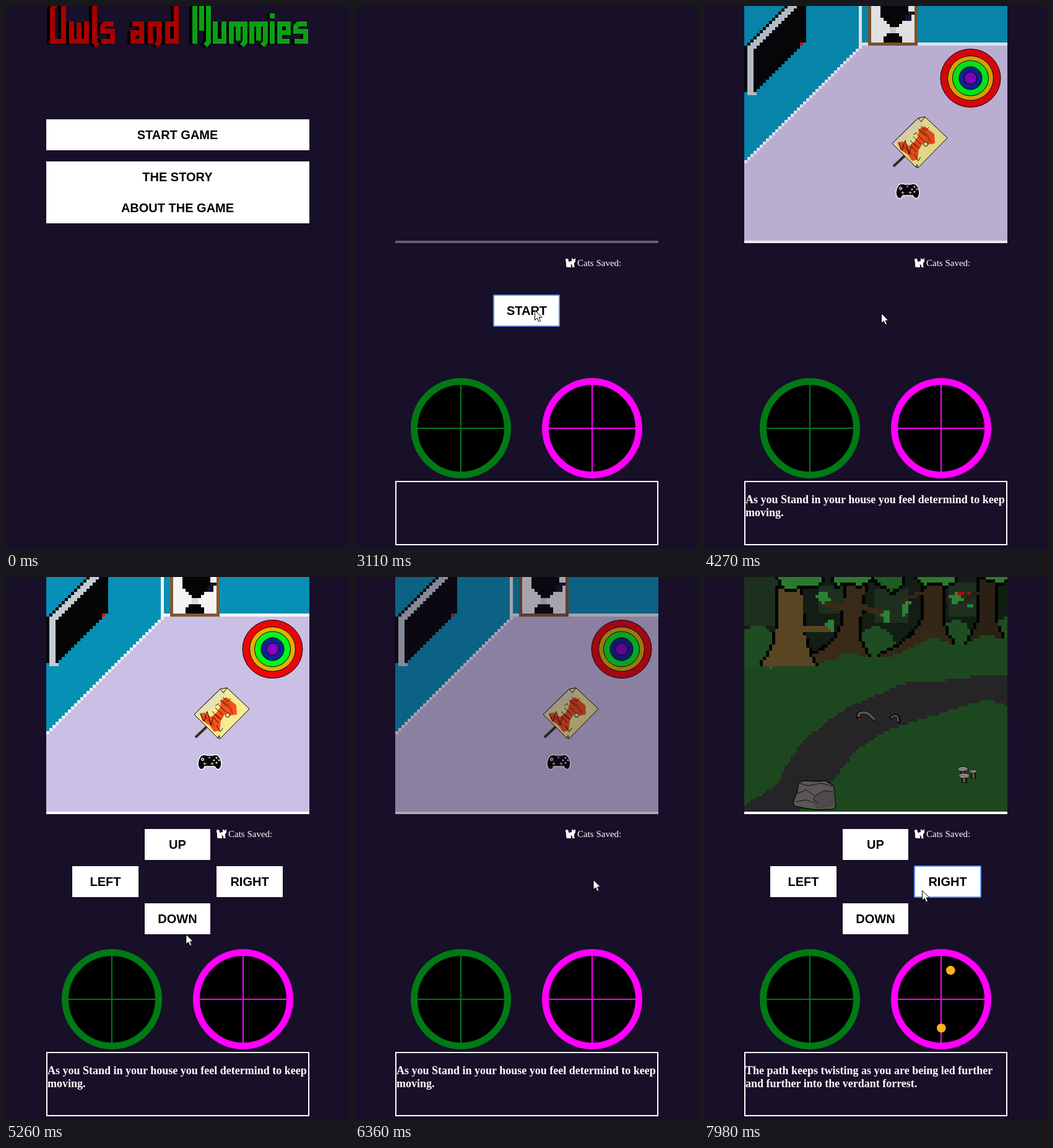
An HTML page with a canvas that plays this animation: 554x877 px, repeating every 8000 ms.

```html
<!DOCTYPE html>
<html lang="en">
<head>
<meta charset="utf-8">
<title>Owls and Mummies</title>
<style>
html, body { margin: 0; width: 100%; height: 100%; overflow: hidden; background: #180f28; }
svg, #view, canvas { position: absolute; left: 0; top: 0; }
#view { width: 490px; height: 383px; }
#line { position: absolute; left: 65px; top: 379px; width: 425px; height: 4px; background: #fff; }
.ui { font: bold 20px "Liberation Sans", Arial, sans-serif; text-anchor: middle; }
.say { font: bold 18px "Liberation Serif", Times, serif; fill: #fff; }
.label { font: 15px "Liberation Serif", Times, serif; fill: #fff; }
.ring { fill: none; stroke: #5b93f0; stroke-width: 2; }

/* one loop is 8 s, so 1% is 80 ms */
#menu, #menuRing, #game, #view, #room, #forest, #start, #startRing, #pad, #rightRing, #say1, .late, #cursor {
  animation: 8s linear infinite;
}
#menuRing, #game, #room, #forest, #start, #startRing, #pad, #rightRing, #say1, .late {
  animation-timing-function: step-end;
}
#menu { animation-name: menu; }
#menuRing { animation-name: menuRing; }
#game { animation-name: game; }
#view { animation-name: view; }
#room, #say1 { animation-name: inHouse; }
#forest, .late { animation-name: inForest; }
#start { animation-name: start; }
#startRing { animation-name: startRing; }
#pad { animation-name: pad; }
#rightRing { animation-name: rightRing; }
#cursor { animation-name: cursor; }

@keyframes menu {
  0%, 8.2% { opacity: 1; animation-timing-function: cubic-bezier(.37,0,.63,1); }
  12.8%, 100% { opacity: 0; }
}
@keyframes menuRing { 0% { opacity: 0; } 7.9%, 100% { opacity: 1; } }
@keyframes game { 0% { opacity: 0; } 13%, 100% { opacity: 1; } }
@keyframes view {
  0%, 12.99% { opacity: 0; }
  13% { opacity: 1; }
  33.6% { opacity: 1; animation-timing-function: cubic-bezier(.37,0,.63,1); }
  42.3% { opacity: 0; }
  45.5% { opacity: 0; animation-timing-function: cubic-bezier(.37,0,.63,1); }
  55.3% { opacity: 1; }
  76.24% { opacity: 1; }
  76.25% { opacity: .91; animation-timing-function: cubic-bezier(.37,0,.63,1); }
  85.3% { opacity: 0; }
  87.5% { opacity: 0; animation-timing-function: cubic-bezier(.37,0,.63,1); }
  97.9%, 100% { opacity: 1; }
}
@keyframes inHouse { 0% { opacity: 0; } 43.5% { opacity: 1; } 86.3%, 100% { opacity: 0; } }
@keyframes inForest { 0% { opacity: 0; } 86.3%, 100% { opacity: 1; } }
@keyframes start { 0% { opacity: 1; } 43.5%, 100% { opacity: 0; } }
@keyframes startRing { 0% { opacity: 0; } 29.7%, 100% { opacity: 1; } }
@keyframes pad { 0% { opacity: 0; } 57.2% { opacity: 1; } 73.5% { opacity: 0; } 98.7%, 100% { opacity: 1; } }
@keyframes rightRing { 0% { opacity: 0; } 72.5%, 100% { opacity: 1; } }
@keyframes cursor {
  0%, .86% { transform: translate(395px, 702px); opacity: 0; }
  .87% { transform: translate(395px, 702px); opacity: 1; animation-timing-function: ease-in-out; }
  7.6%, 19.6% { transform: translate(327px, 210px); animation-timing-function: ease-in-out; }
  29.7% { transform: translate(278px, 472px); }
  30.9%, 33.5% { transform: translate(293px, 479px); }
  38.5%, 42.5% { transform: translate(290px, 491px); }
  44.5%, 56.8% { transform: translate(286px, 496px); }
  61.9%, 64% { transform: translate(283px, 563px); }
  65.5% { transform: translate(290px, 577px); animation-timing-function: ease-in-out; }
  72%, 76.6% { transform: translate(386px, 488px); }
  82.3% { transform: translate(383px, 489px); }
  86.4%, 88% { transform: translate(382px, 490px); }
  97.8%, 100% { transform: translate(352px, 506px); opacity: 1; }
}
</style>
</head>
<body>
<div id="view">
  <canvas id="room" width="490" height="379"></canvas>
  <canvas id="forest" width="490" height="379"></canvas>
  <div id="line"></div>
</div>
<svg width="554" height="877">
  <g id="menu">
    <g id="title" role="img" aria-label="Owls and Mummies"></g>
    <path fill="#fff" d="M65 183h425v50H65zM65 251h425v100H65z"/>
    <rect id="menuRing" class="ring" x="65" y="183" width="425" height="50" rx="1"/>
    <g class="ui">
      <text x="277" y="215">START GAME</text>
      <text x="277" y="283">THE STORY</text>
      <text x="277" y="333">ABOUT THE GAME</text>
    </g>
  </g>
  <g id="game">
    <path fill="#fff" d="M340 410q0-2 2-2 3 0 3 4v1l5-1v-5l2 2h2l2-2v5q0 2-2 3v5l1 2h-4v-3q-1-2-3-2 2 2 1 5h-6q-2 0-2-3v-4q0-3-1-3z"/>
    <text class="label" x="359" y="420">Cats Saved:</text>
    <g id="start" class="ui">
      <rect x="224" y="467" width="106" height="50" fill="#fff"/>
      <rect id="startRing" class="ring" x="224" y="467" width="106" height="50" rx="1"/>
      <text x="277.5" y="499">START</text>
    </g>
    <g id="pad" class="ui">
      <path fill="#fff" d="M224 407h106v50H224zM107 467h107v50H107zM340 467h107v50H340zM224 527h106v50H224z"/>
      <rect id="rightRing" class="ring" x="340" y="467" width="107" height="50" rx="1"/>
      <text x="277" y="439">UP</text>
      <text x="160.5" y="499">LEFT</text>
      <text x="393.5" y="499">RIGHT</text>
      <text x="277" y="559">DOWN</text>
    </g>
    <g stroke="#007a14">
      <circle cx="171" cy="682" r="75.5" stroke-width="11"/>
      <path stroke-width="2" d="M171 607v150M96 682h150"/>
    </g>
    <g stroke="#f0f">
      <circle cx="383" cy="682" r="75.5" stroke-width="11"/>
      <path stroke-width="2" d="M383 607v150M308 682h150"/>
    </g>
    <g class="late" fill="#ffb31a">
      <circle cx="398.3" cy="635.3" r="7.3"/>
      <circle cx="383.3" cy="728.5" r="7.3"/>
    </g>
    <rect x="66" y="768" width="423" height="102" fill="none" stroke="#fff" stroke-width="2"/>
    <g id="say1" class="say">
      <text x="67" y="803">As you Stand in your house you feel determind to keep</text>
      <text x="67" y="824">moving.</text>
    </g>
    <g class="say late">
      <text x="67" y="803">The path keeps twisting as you are being led further</text>
      <text x="67" y="824">and further into the verdant forrest.</text>
    </g>
  </g>
  <path id="cursor" fill="#fff" stroke="#000" d="M.5.5v16l3.8-3.6 2.5 6 2.8-1.2-2.5-5.7h5z"/>
</svg>
<script>
// Title lettering: stroke path and advance for each letter
const glyphs = {
  O: ["M4 57V4L10-4H22V57Z", 31],
  w: ["M4 25V57H28V25M16 27V57", 37],
  l: ["M4-5V58L9 64", 13],
  s: ["M22 29H8L4 33V41H20V57H2", 26],
  a: ["M3 29H18V57H4V43H18", 28],
  n: ["M4 61V29H18V58L13 64", 28],
  d: ["M18-5V57H4V29H18", 28],
  M: ["M4 61V-4H26V58L21 64M15 0V40", 33],
  u: ["M4 25V57H18V25", 26],
  m: ["M4 61V29H26V58L21 64M15 29V56", 33],
  i: ["M4 25V61M4 12V20", 12],
  e: ["M20 57H4V29H18V43H4", 26]
};

function word(text, x, color) {
  let out = "";
  for (const ch of text) {
    const [d, step] = glyphs[ch];
    out += `<path d="${d}" transform="translate(${x})"/>`;
    x += step;
  }
  const layer = (c, dx, dy) =>
    `<g fill="none" stroke-width="8" stroke="${c}" transform="translate(${dx} ${dy})">${out}</g>`;
  return layer("#000", -5, 1) + layer(color, 0, 0);
}
document.getElementById("title").innerHTML =
  word("Owls", 71, "#a80000") + word("and", 201, "#a80000") + word("Mummies", 301, "#0a9f14");

const CELL = 5;
const context = id => document.getElementById(id).getContext("2d");

// Fill a path in blocks, with an optional one-block black outline
function blocks(g, color, d, outlined) {
  const path = new Path2D(d);
  g.lineWidth = 9;
  const pass = (fill, hit) => {
    g.fillStyle = fill;
    for (let y = -1; y < 379; y += CELL)
      for (let x = 65; x < 490; x += CELL)
        if (hit(x + 2.5, y + 2.5)) g.fillRect(x, y, CELL, CELL);
  };
  if (outlined) pass("#030303", (x, y) => g.isPointInStroke(path, x, y));
  pass(color, (x, y) => g.isPointInPath(path, x, y));
}

function shape(g, d, fill, line, width = 1) {
  const path = new Path2D(d);
  if (fill) { g.fillStyle = fill; g.fill(path); }
  if (line) { g.strokeStyle = line; g.lineWidth = width; g.stroke(path); }
}

function oval(g, x, y, rx, ry, fill, line) {
  g.beginPath();
  g.ellipse(x, y, rx, ry, 0, 0, 7);
  g.fillStyle = fill;
  g.fill();
  if (line) { g.strokeStyle = line; g.lineWidth = 1; g.stroke(); }
}

function drawRoom(g) {
  const wall = "#0690b6", trim = "#f6f5f6";
  g.fillStyle = "#cabfe4";
  g.fillRect(65, 0, 425, 379);
  blocks(g, wall, "M65-5H250V66L65 251Z");
  blocks(g, wall, "M255-5H490V59H255Z");
  blocks(g, trim, "M250-5h5V59H490V64H255V66L65 256V252L250 67Z");

  // screen on the left wall
  blocks(g, "#050505", "M65 66.5L134.5-3H165V56L82 139H65Z");
  blocks(g, "#c3ccd6", "M70 66.5L139.5-3H154.5L80 71.5V139H85V144H70Z");
  blocks(g, "#e01010", "M155 59h5v5h-5Z");

  // framed picture
  blocks(g, "#80592f", "M265-5h80V64h-80Z");
  blocks(g, "#f4f4f6", "M270-5h70V59h-70Z");
  blocks(g, "#050505", "M284-5H330V14L322 25 312 34H300L290 22 284 10Z");
  blocks(g, "#050505", "M288 60V52L300 44H312L322 54V60Z");
  blocks(g, "#d8d8dd", "M300 34h10v10h-10Z");
  blocks(g, "#14142c", "M330 9h10v5h-5v8h-10v-8h5Z");

  // rug
  [[48.5, 47, "#eb0508"], [37, 36, "#e6b000"], [29, 28.5, "#00f81c"],
   [18.5, 18.5, "#0c2594"], [10, 10, "#8700c8"]]
    .forEach(([rx, ry, c]) => oval(g, 430.5, 116.5, rx, ry, c, "#000"));

  // painted sheet
  shape(g, "M306 259L324 242", null, "#35301f", 4);
  shape(g, "M304 222L346 181 357 179 393 213 346 261 342 260Z", "#f4eb92", "#000");
  shape(g, "M304 222L346 181 357 190 316 226Z", "#e9e1b2");
  shape(g, "M304 222L346 181 351 187 357 179M342 260L344 256 346 261", null, "#000");
  shape(g, "M313 220L322 219 331 226 340 219 346 210 347 199 356 194 372 207 373 222 361 224 354 221 347 232 345 248 336 250 329 240 317 232Z", "#f8501a");
  shape(g, "M350 200L360 208 366 220M320 224L336 240M338 222L348 230", null, "#c43a10", 3);
  shape(g, "M314 221l6 12 5-16 6 22 4-13 8 10M333 217l12 12M338 211l12 12M343 206l12 12M346 199l12 11M340 240l6 10 4-6M350 194l8 7 5-5M338 208l6-4", null, "#1a0d05");
  oval(g, 358, 223, 3.5, 3.5, "#f4eb92", "#000");

  // gamepad
  shape(g, "M316 288Q321 286 324 288H334Q338 286 342 288 347 292 348 301 348 309 343 311 339 310 337 306H321Q319 311 315 311 310 309 310 301 311 292 316 288Z", "#060606", "#fff", 1.5);
  shape(g, "M321 299v5M318.5 301.5h5M333 299v5M330.5 301.5h5M327 290l3 3M330 290l-3 3", null, "#ddd");
  oval(g, 317.5, 294.5, 2.2, 2.2, "#777", "#fff");
  [[340, 292], [344, 296], [336, 296], [340, 300]].forEach(([x, y]) => oval(g, x, y, 1.5, 1.5, "#ddd"));
}

function drawForest(g) {
  const grass = "#1d481f", bush = "#1f4d22", leaf = "#2e8036", top = "#2b7a2e";
  g.fillStyle = grass;
  g.fillRect(65, 0, 425, 379);
  blocks(g, "#121d14", "M65-5H490V98L440 102 400 108 355 95 290 130 235 125 180 140 95 138 65 100Z");
  blocks(g, "#1d2f1f", "M65-5H120V80H65ZM185 15H225V60H185ZM275 20H330V75H275ZM395 10H440V65H395Z");

  // undergrowth
  blocks(g, bush, "M65 88Q85 70 105 85L115 105 95 145H65Z");
  blocks(g, bush, "M248 130Q242 85 275 80 305 82 311 115L300 135Z");
  blocks(g, bush, "M386 105Q380 72 408 69 432 72 430 100L415 110Z");
  blocks(g, bush, "M470 100Q470 66 492 64V105Z");

  // trunks, far to near
  blocks(g, "#2a2114", "M443-5H472L468 45Q470 80 482 97V110H423Q446 80 447 45Z", true);
  blocks(g, "#2a2114", "M445 30L412 45 380 34 384 29 412 38 445 22Z");
  blocks(g, "#352715", "M358-5H387L383 55Q386 90 402 106V140H287V125Q350 98 355 55Z", true);
  blocks(g, "#352715", "M358 28L325 38V60H320V34L358 20Z");
  blocks(g, "#3a2a18", "M230-5H262L252 65Q246 105 263 124V150H175V125Q222 108 226 60Z", true);
  blocks(g, "#3a2a18", "M252 42L290 56V64L250 52ZM230 58L195 46 190 30H196L203 40 230 48Z");
  blocks(g, "#5a4523", "M123-5H157L158 60Q162 115 178 138V155H95V138Q116 115 119 70Z", true);
  blocks(g, "#5a4523", "M157 79H205V89H157Z");

  // ground hides the trunk bases
  blocks(g, grass, "M65 144H180L200 135H210L225 123H240L262 131H290L320 122 345 110 365 97 385 103 405 112 430 105 455 92 475 98H490V170H65Z");
  blocks(g, "#5a4523", "M105 143h5v6h-5Z");

  // canopy and loose leaves
  blocks(g, top, "M120-5H190V6L178 15 160 12 145 20 125 15Z", true);
  blocks(g, top, "M205-5H268V5L250 13 230 8 215 14Z", true);
  blocks(g, "#1d5c22", "M275-5H318V14L305 23 290 14 280 10Z", true);
  blocks(g, top, "M340-5H405V6L390 13 372 7 358 12Z", true);
  blocks(g, top, "M440-5H490V4L478 9 462 5Z", true);
  blocks(g, leaf, "M180 29L195 22 205 36 190 45ZM196 72L208 70 210 88 200 84ZM286 58L298 54 300 72 290 74ZM318 44L334 39 330 55 320 66ZM396 30L410 24 420 38 402 44ZM424 42H434V48H424Z");
  blocks(g, "#b00808", "M410 24h10v5h-10ZM425 24h5v5h-5Z");

  // path
  blocks(g, "#262427", "M65 368Q118 340 125 322 140 285 170 258 210 220 250 203L325 171 395 166 440 160H490V209Q462 194 430 205L370 224 310 243Q262 262 236 292L210 329 150 380H65Z");

  // creatures on the path
  shape(g, "M250 229Q246 218 257 219 265 219 269 224T276 230", null, "#050505", 6);
  shape(g, "M250 226Q248 219 257 219 265 219 269 224T276 229", null, "#575555", 4);
  shape(g, "M301 229Q309 220 314 226L315 236", null, "#050505", 5);
  shape(g, "M302 228Q309 221 313 226L314 234", null, "#575555", 2.5);
  oval(g, 250.5, 229.5, 1.8, 1.8, "#a80a0a");

  // rock
  shape(g, "M144 364L151 345 153 332 161 329 184 330 196 329 209 337 211 349 213 371 208 375 181 376 160 373 146 370Z", "#5b5756", "#080808", 1.3);
  shape(g, "M182 350L194 345 209 346 212 370 181 375 177 360Z", "#4d4a4a");
  shape(g, "M150 350L165 344 179 354 194 345 209 347M179 354L177 360 184 365M154 333L168 337 190 333 207 338M148 363L165 360 178 365", null, "#111");

  // mushrooms
  for (const [x, y, r] of [[418, 310, 8.5], [435, 314, 6.5], [420, 321, 9]]) {
    g.fillStyle = "#0d1d0d";
    g.fillRect(x - 4, y + 2, 9, 10);
    g.fillStyle = "#77633a";
    g.fillRect(x - 1.5, y + 2, 3, 9);
    oval(g, x, y, r, r * .46, "#8f8b8b", "#0a0a0a");
    for (let i = -2; i < 3; i++) oval(g, x + i * r / 3, y + i % 2, .8, .7, "#3c3838");
  }
}

drawRoom(context("room"));
drawForest(context("forest"));
</script>
</body>
</html>
```
